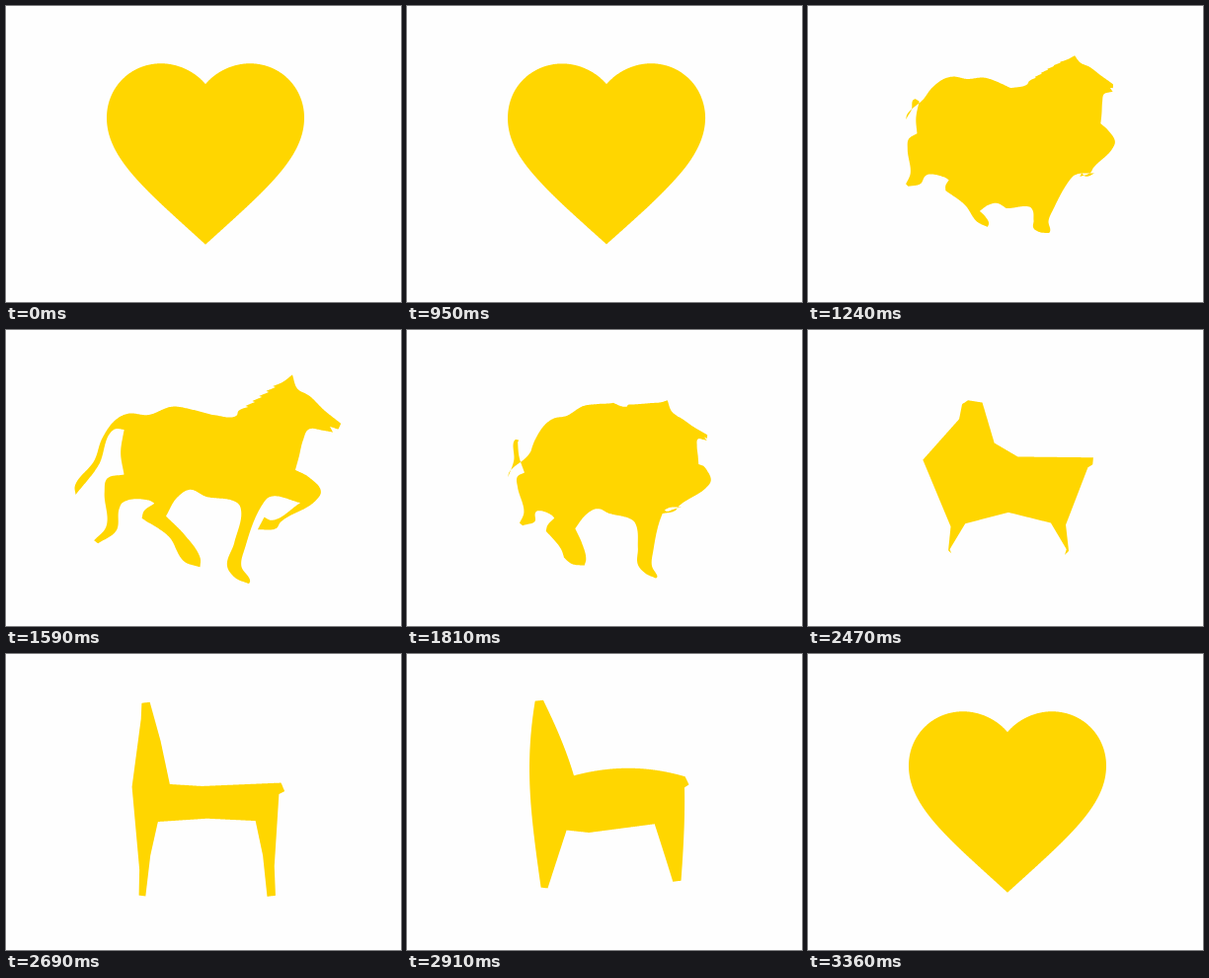
Animation of 400 by 300 pixels, one loop 3.79 s. Source, as an HTML page with a canvas:

```html
<!DOCTYPE html>
<html lang="en">
<head>
<meta charset="utf-8">
<title>Shape morph</title>
<style>
html, body { margin: 0; height: 100%; overflow: hidden; background: #fefefe; }
canvas { display: block; width: 400px; height: 300px; }
</style>
</head>
<body>
<canvas id="stage" width="400" height="300"></canvas>
<script>
const COUNT = 1500;
const LOOP = 3790, FIRST = 950, STEP = 57.3;
const START = 960, LEN = 600;

const toPoints = text => text.trim().split(/\s+/).map(p => p.split(',').map(Number));
const mix = (a, b, k) => [a[0] + (b[0] - a[0]) * k, a[1] + (b[1] - a[1]) * k];
const dist2 = (a, b) => (a[0] - b[0]) ** 2 + (a[1] - b[1]) ** 2;
const unit = (a, b) => {
  const d = Math.sqrt(dist2(a, b)) || 1;
  return [(b[0] - a[0]) / d, (b[1] - a[1]) / d];
};

// Evenly spaced points along a path
function trace(d) {
  const path = document.createElementNS('http://www.w3.org/2000/svg', 'path');
  path.setAttribute('d', d);
  const total = path.getTotalLength();
  return Array.from({ length: COUNT }, (_, i) => {
    const p = path.getPointAtLength(total * i / COUNT);
    return [p.x, p.y];
  });
}

const polygon = pts => 'M' + pts.join('L') + 'Z';

// Closed curve through the points; sharp turns stay corners
function smooth(pts) {
  const n = pts.length;
  const sides = pts.map((p, i) => {
    const u = unit(pts[(i + n - 1) % n], p), v = unit(p, pts[(i + 1) % n]);
    if (u[0] * v[0] + u[1] * v[1] < 0.3) return [u, v];
    const m = unit([0, 0], [u[0] + v[0], u[1] + v[1]]);
    return [m, m];
  });
  let d = 'M' + pts[0];
  pts.forEach((p, i) => {
    const j = (i + 1) % n, q = pts[j], s = Math.sqrt(dist2(p, q)) / 3;
    const a = sides[i][1], b = sides[j][0];
    d += `C${p[0] + a[0] * s},${p[1] + a[1] * s} ${q[0] - b[0] * s},${q[1] - b[1] * s} ${q}`;
  });
  return d + 'Z';
}

const heart = trace('M202 79.15C212.9 66.35 229.6 58.25 247 58.25C277.8 58.25 302 82.45 302 113.25' +
  'C302 151.05 268 181.85 216.5 228.65L202 241.75L187.5 228.55C136 181.85 102 151.05 102 113.25' +
  'C102 82.45 126.2 58.25 157 58.25C174.4 58.25 191.1 66.35 202 79.15Z');

const corners = Array.from({ length: 10 }, (_, i) => {
  const r = i % 2 ? 47.8 : 105.1, a = (i / 5 - 0.5) * Math.PI;
  return [202 + r * Math.cos(a), 160.1 + r * Math.sin(a)];
});
const tips = corners.filter((_, i) => i % 2 === 0);
const star = trace(polygon(corners));

const chair = trace(polygon(toPoints(`158,138 275,131 280,140 274,143 276,252 266,252
  255,160 152,161 140,252 132,252 131,41 140,41`)));

const body = {
  head: '291,45 296,59 308,66 323,81 340,95 337,101 328,98 331,104 320,102 305,101 299,112 294,130',
  raised: '290,143 305,151 317,165 311,175 276,196 272,202 253,203 260,190 268,193 298,174 266,167',
  front: '258,175 240,218 236,237 245,252 244,255 230,249 222,237 230,213 237,176 232,171',
  belly: '202,166 186,159 173,167 162,186 182,205 199,229 199,238 183,232 168,207 139,188',
  hind: '141,181 152,173 146,170 119,173 115,180 112,203 93,217 89,214 102,200 101,165 104,151 122,147',
  tail: '119,125 123,101 112,101 95,138 70,169 69,160 88,134 96,111 110,92 123,86',
  back: '143,88 168,80 190,84 212,90 234,90'
};
const mane = [];
for (let i = 0; i < 6; i++) {
  const x = 240 + 7 * i, y = 85 - 5.5 * i;
  mane.push([x - 4, y], [x + 6, y - 4.5]);
}
const outline = toPoints(Object.values(body).join(' ')).concat(mane);
const horse = trace(smooth(outline.map(p => mix([202, 155], p, 1.03))));

// Start the second outline where both lie closest together
function align(a, b) {
  let best = Infinity, shift = 0;
  for (let s = 0; s < COUNT; s += 3) {
    let sum = 0;
    for (let i = 0; i < COUNT; i += 5) sum += dist2(a[i], b[(i + s) % COUNT]);
    if (sum < best) { best = sum; shift = s; }
  }
  return [a, a.map((_, i) => b[(i + shift) % COUNT])];
}

function nearest(pts, p) {
  let best = 0;
  pts.forEach((q, i) => { if (dist2(p, q) < dist2(p, pts[best])) best = i; });
  return best;
}

function at(pts, pos) {
  const i = Math.floor(pos);
  return mix(pts[i % COUNT], pts[(i + 1) % COUNT], pos - i);
}

// Pair two outlines so that their key points meet
function pair(a, b, keysA, keysB) {
  const ia = keysA.map(p => nearest(a, p)), ib = keysB.map(p => nearest(b, p));
  const from = [], to = [];
  ia.forEach((sa, k) => {
    const j = (k + 1) % ia.length, sb = ib[k];
    const la = (ia[j] - sa + COUNT) % COUNT, lb = (ib[j] - sb + COUNT) % COUNT;
    const n = Math.max(la, lb, 1);
    for (let i = 0; i < n; i++) {
      from.push(at(a, sa + la * i / n));
      to.push(at(b, sb + lb * i / n));
    }
  });
  return [from, to];
}

const morphs = [
  align(heart, horse),
  align(horse, star),
  pair(star, chair, tips, toPoints('150,93 275,131 258,198 147,198 131,136')),
  pair(chair, heart,
    toPoints('158,138 275,131 266,252 178,161 132,252 131,41'),
    toPoints('202,79 301,104 279,167 202,242 147,190 126,68'))
];

const ctx = document.getElementById('stage').getContext('2d');

function fill(pts) {
  ctx.fillStyle = '#fefefe';
  ctx.fillRect(0, 0, 400, 300);
  ctx.fillStyle = '#ffd600';
  ctx.beginPath();
  pts.forEach(p => ctx.lineTo(p[0], p[1]));
  ctx.closePath();
  ctx.fill();
}

function draw(time) {
  // The motion advances in short steps
  const held = FIRST + Math.floor((time - FIRST) / STEP) * STEP + 12;
  const pos = (held - START) / LEN;
  if (time < FIRST || pos >= morphs.length) return fill(heart);
  const k = Math.floor(pos);
  const [a, b] = morphs[k];
  fill(a.map((p, i) => mix(p, b[i], pos - k)));
}

const begin = performance.now();
function tick() {
  draw((performance.now() - begin) % LOOP);
  requestAnimationFrame(tick);
}
tick();
</script>
</body>
</html>
```
